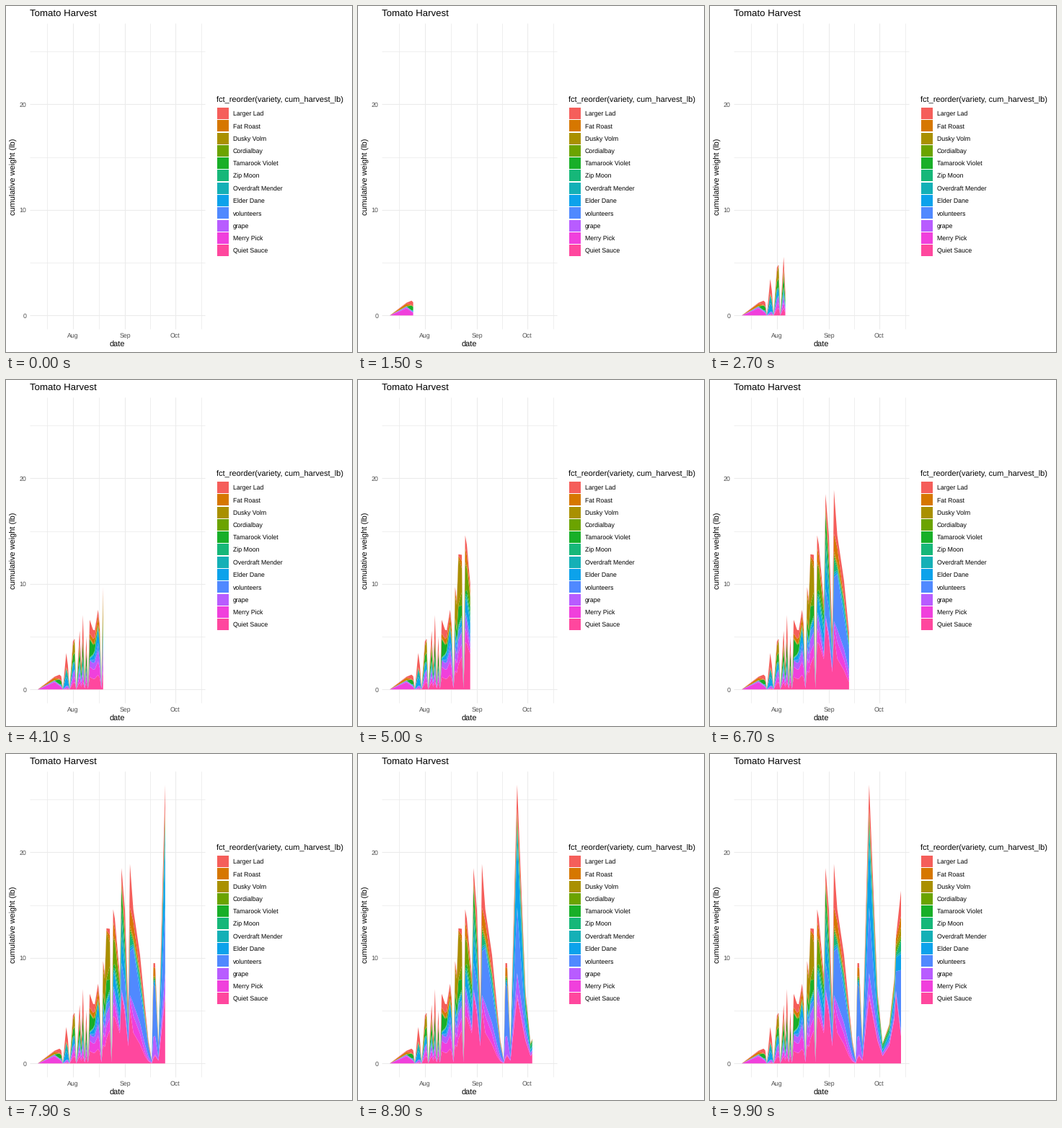
These frames come from a looping animation (480x480 px, 10000 ms). A matplotlib script:

```python
import numpy as np
import matplotlib.pyplot as plt
from matplotlib.animation import FuncAnimation
from matplotlib.patches import Polygon, Rectangle

SIZE, DPI = 480, 80
FRAMES, INTERVAL = 100, 100
LAST_DAY = 95
PX = 72 / DPI  # points per pixel

plt.rcParams["font.family"] = "Liberation Sans"
plt.rcParams["text.hinting"] = "none"

# Legend order, which is also the stack from top to bottom.
VARIETIES = [
    ("red", "Larger Lad", "#f55e5a"),
    ("orange", "Fat Roast", "#d67700"),
    ("olive", "Dusky Volm", "#a99000"),
    ("lime", "Cordialbay", "#6ba300"),
    ("green", "Tamarook Violet", "#18af28"),
    ("jade", "Zip Moon", "#16b779"),
    ("teal", "Overdraft Mender", "#14b0b6"),
    ("sky", "Elder Dane", "#0ca2eb"),
    ("blue", "volunteers", "#5089ff"),
    ("purple", "grape", "#b85cff"),
    ("magenta", "Merry Pick", "#f040dc"),
    ("pink", "Quiet Sauce", "#ff479e"),
]

# Total weight picked on each harvest day (days since 11 July).
TOTALS = {
    0: 0, 10: 1.2, 13: 1.4, 14: 1.25, 15: 0.05, 17: 3.45, 18: 2.3, 19: 0.1,
    21: 4.55, 22: 4.8, 23: 0.1, 25: 5.55, 26: 2.2, 27: 7.05, 28: 0.9,
    29: 5.0, 30: 0.5, 31: 6.6, 33: 5.65, 34: 5.6, 36: 7.55, 37: 6.0,
    38: 0.6, 39: 9.7, 40: 8.5, 41: 12.8, 43: 12.75, 44: 0.4, 45: 14.6,
    46: 13.7, 49: 8.3, 50: 18.5, 52: 14.5, 54: 5.6, 55: 18.9, 57: 14.6,
    61: 10.3, 64: 5.4, 66: 2.2, 68: 0.3, 69: 9.5, 70: 9.5, 72: 2.0,
    76: 26.4, 81: 6.8, 84: 1.9, 88: 3.7, 91: 8.0, 92: 12.0, 95: 16.35,
}

# Leading shares of the harvest; varieties not listed get a trace.
MIX = {
    10: dict(magenta=60, purple=10, orange=20, red=8),
    13: dict(magenta=25, purple=5, green=32, red=30),
    17: dict(purple=6, sky=24, teal=20, red=38),
    22: dict(pink=14, magenta=10, purple=12, sky=12, green=16, olive=22),
    27: dict(pink=10, magenta=9, purple=9, teal=11, green=20, red=30),
    31: dict(pink=18, magenta=15, purple=9, green=26, orange=6, red=20),
    36: dict(pink=17, magenta=16, purple=13, blue=9, sky=16, orange=10, red=7),
    41: dict(pink=16, magenta=8, purple=8, blue=6, green=12, olive=30),
    45: dict(pink=27, magenta=8, purple=8, sky=8, lime=16, orange=8, red=7),
    50: dict(pink=34, blue=13, sky=13, teal=9, jade=6, green=9, red=6),
    55: dict(pink=25, magenta=5, blue=20, jade=6, orange=8, red=20),
    57: dict(pink=20, magenta=11, purple=8, blue=36, orange=10, red=8),
    61: dict(pink=16, magenta=9, purple=9, blue=26, sky=6, jade=5, red=14),
    69: dict(pink=5, purple=20, blue=52, orange=9, red=4),
    76: dict(pink=22, purple=7, blue=22, sky=21, teal=6, red=8),
    84: dict(pink=30, purple=12, sky=10, jade=14, green=8),
    92: dict(pink=50, blue=14, sky=10, lime=4, orange=5),
    95: dict(pink=15, blue=34, sky=9, jade=6, olive=5, orange=6, red=14),
}


def x_of(day):
    return 44 + 221 * np.asarray(day) / LAST_DAY


def y_of(weight):
    return 429.3 - 14.65 * np.asarray(weight)


def stack_edges():
    """Cumulative weights, one row per boundary, from the baseline up."""
    keys = [v[0] for v in reversed(VARIETIES)]
    share = np.array([[row.get(k, 1.2) for k in keys] for row in MIX.values()])
    share /= share.sum(axis=1, keepdims=True)
    parts = [np.interp(days, list(MIX), col) * totals for col in share.T]
    return np.vstack([np.zeros(len(days)), np.cumsum(parts, axis=0)])


days = np.array(list(TOTALS), float)
totals = np.array(list(TOTALS.values()), float)
edges = stack_edges()

fig = plt.figure(figsize=(SIZE / DPI, SIZE / DPI), dpi=DPI, facecolor="white")
ax = fig.add_axes([0, 0, 1, 1])
ax.set_xlim(0, SIZE)
ax.set_ylim(SIZE, 0)
ax.axis("off")


def label(x, y, text, size, color="black", ha="left", **kw):
    ax.text(x, y, text, fontsize=size * PX, color=color, ha=ha,
            va="baseline", **kw)


def grid(xs, ys, width):
    style = dict(color="#ebebeb", lw=width * PX, zorder=1,
                 solid_capstyle="butt")
    for x in xs:
        ax.plot([x, x], [24, 448], **style)
    for y in ys:
        ax.plot([33.2, 276], [y, y], **style)


months = {"Aug": 21, "Sep": 52, "Oct": 82}
grid(x_of([5.5, 36.5, 67, 97.5]), y_of([5, 15, 25]), 0.75)
grid(x_of(list(months.values())), y_of([0, 10, 20]), 1.07)

for name, day in months.items():
    label(x_of(day), 460, name, 8.8, "#4d4d4d", "center")
for w in (0, 10, 20):
    label(28.3, y_of(w) + 3.3, str(w), 8.8, "#4d4d4d", "right")

label(33, 15.2, "Tomato Harvest", 13.2)
label(154.5, 473, "date", 11, ha="center")
ax.text(13.6, 236.3, "cumulative weight (lb)", fontsize=11 * PX, rotation=90,
        ha="right", va="center", rotation_mode="default").set(
            ha="center", va="baseline", rotation_mode="anchor")

label(292.3, 134, "fct_reorder(variety, cum_harvest_lb)", 11)
for i, (_, name, color) in enumerate(VARIETIES):
    mid = 149 + 17.28 * i
    ax.add_patch(Rectangle((293, mid - 8), 16, 16, fc=color, lw=0))
    label(315, mid + 3.2, name, 8.8)

areas = []
for _, _, color in reversed(VARIETIES):
    area = Polygon([(0, 0)] * 3, closed=True, fc=color, lw=0, zorder=3)
    areas.append(ax.add_patch(area))


def update(frame):
    today = round(LAST_DAY * frame / (FRAMES - 1))
    shown = np.append(days[days < today], today)
    xs = x_of(shown)
    ys = [y_of(np.interp(shown, days, edge)) for edge in edges]
    for area, low, high in zip(areas, ys, ys[1:]):
        area.set_visible(today > 0)
        area.set_xy(np.column_stack([np.r_[xs, xs[::-1]],
                                     np.r_[low, high[::-1]]]))
    return areas


anim = FuncAnimation(fig, update, frames=FRAMES, interval=INTERVAL,
                     repeat=True, repeat_delay=0)
plt.show()
```
